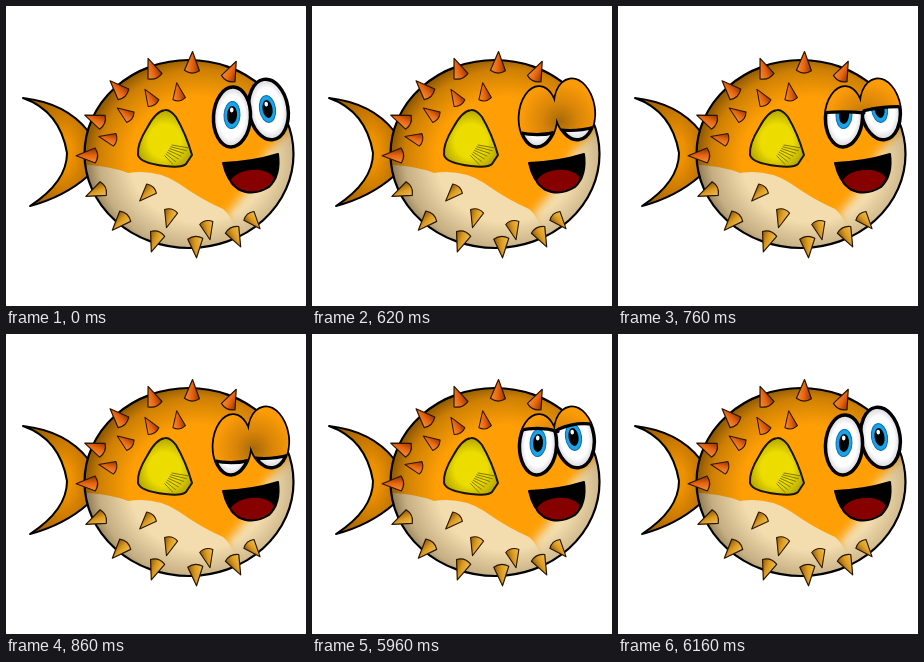
Write an HTML page that moves like this. It is 300 by 300 pixels and loops after 8000 ms.

```html
<!DOCTYPE html>
<html lang="en">
<head>
<meta charset="utf-8">
<title>Blinking puffer fish</title>
<style>
html, body { margin: 0; width: 100%; height: 100%; overflow: hidden; background: #fff; }
svg { display: block; width: 300px; height: 300px; }
</style>
</head>
<body>
<svg viewBox="0 0 300 300" stroke-linejoin="round" stroke-linecap="round">
  <defs>
    <radialGradient id="rim" cx=".55" cy=".53" r=".57">
      <stop offset=".58" stop-color="#3c2400" stop-opacity="0"/>
      <stop offset=".84" stop-color="#3c2400" stop-opacity=".25"/>
      <stop offset="1" stop-color="#241400" stop-opacity=".6"/>
    </radialGradient>
    <radialGradient id="tail" cx=".62" cy=".5" r=".65">
      <stop offset=".2" stop-color="#ef9200"/>
      <stop offset="1" stop-color="#9a5c00"/>
    </radialGradient>
    <radialGradient id="finFill" cx=".5" cy=".55" r=".6">
      <stop offset=".5" stop-color="#ecdc00"/>
      <stop offset="1" stop-color="#a89a00"/>
    </radialGradient>
    <linearGradient id="warm">
      <stop offset="0" stop-color="#f09040"/>
      <stop offset=".5" stop-color="#e8650c"/>
      <stop offset="1" stop-color="#8c3606"/>
    </linearGradient>
    <linearGradient id="pale">
      <stop offset="0" stop-color="#e8c050"/>
      <stop offset=".5" stop-color="#dd9c20"/>
      <stop offset="1" stop-color="#8c5a10"/>
    </linearGradient>
    <radialGradient id="lidFill" gradientUnits="userSpaceOnUse" cx="248" cy="115" r="46">
      <stop offset="0" stop-color="#a86a08"/>
      <stop offset=".4" stop-color="#d98508"/>
      <stop offset=".85" stop-color="#fb9b08"/>
    </radialGradient>
    <radialGradient id="eyeball">
      <stop offset=".7" stop-color="#fff"/>
      <stop offset="1" stop-color="#d4d4dc"/>
    </radialGradient>
    <filter id="soft" x="-50%" y="-50%" width="200%" height="200%"><feGaussianBlur stdDeviation="5"/></filter>
    <ellipse id="body" cx="183" cy="148" rx="104.5" ry="94"/>
    <ellipse id="leftEye" cx="226" cy="111" rx="18.5" ry="30" transform="rotate(3 226 111)"/>
    <ellipse id="rightEye" cx="262.5" cy="103.5" rx="19.5" ry="30.5" transform="rotate(-9 262.5 103.5)"/>
    <path id="mouth" d="M217 157Q246 156 272 148Q275 170 263 181Q247 191 232 183Q221 175 217 157Z"/>
    <clipPath id="inBody"><use href="#body"/></clipPath>
    <clipPath id="inEyes"><use href="#leftEye"/><use href="#rightEye"/></clipPath>
    <clipPath id="inMouth"><use href="#mouth"/></clipPath>
  </defs>

  <path d="M17 92Q60 97 82 125V170Q58 191 24 200Q61 176 61 147Q54 105 17 92Z" fill="url(#tail)" stroke="#000" stroke-width="2"/>
  <use href="#body" fill="#ff9f05"/>
  <g clip-path="url(#inBody)" fill="#f3ddae">
    <path d="M222 206Q246 182 258 150L274 132L300 108V250H222Z" filter="url(#soft)"/>
    <path d="M70 158Q105 160 122 167Q150 163 172 177Q196 194 217 203Q232 215 232 250H70Z"/>
  </g>
  <use href="#body" fill="url(#rim)" stroke="#000" stroke-width="2.2"/>

  <g id="spikes" stroke="#2a1400" stroke-width="1.2"></g>

  <path d="M159 104Q150 105 141 122Q131 138 132 149Q134 157 159 160Q176 162 180 158L186 149Q180 128 170 111Q164 103 159 104Z" fill="url(#finFill)" stroke="#171400" stroke-width="2"/>
  <path id="ribs" fill="none" stroke="#817600"/>

  <use href="#mouth"/>
  <ellipse cx="246" cy="176" rx="22" ry="12" fill="#860000" transform="rotate(-6 246 176)" clip-path="url(#inMouth)"/>
  <use href="#mouth" fill="none" stroke="#000" stroke-width="2"/>

  <g fill="url(#eyeball)" stroke="#000" stroke-width="3.5">
    <use href="#rightEye"/>
    <use href="#leftEye"/>
  </g>
  <g id="pupils"></g>
  <g clip-path="url(#inEyes)">
    <path id="lids" fill="url(#lidFill)"/>
    <path id="edges" fill="none" stroke="#000" stroke-width="3.2"/>
  </g>
</svg>
<script>
const get = id => document.getElementById(id);
const mix = (a, b, k) => a + (b - a) * k;

// A horn on the body, pointing away from its centre.
function spike(degrees, radius, size) {
  const a = degrees * Math.PI / 180;
  const x = 183 + 104 * radius * Math.cos(a), y = 148 + 94 * radius * Math.sin(a);
  const fill = y < 150 ? 'warm' : 'pale';
  return `<path transform="translate(${x} ${y}) rotate(${degrees + 90}) scale(${size})"
    d="M0 -13L-7.5 6Q0 11 7.5 6Z" fill="url(#${fill})"/>`;
}

// Spikes spread evenly along an arc, between two angles and two radii.
const arc = (count, from, to, r0, r1, size) => Array.from({ length: count }, (_, i) => {
  const k = i / (count - 1);
  return spike(mix(from, to, k), mix(r0, r1, k), size);
}).join('');

get('spikes').innerHTML =
  arc(11, 63, 295, .97, .95, 1) + arc(4, 49, 134, .93, .57, .9) + arc(4, 192, 261, .78, .65, .85);

get('ribs').setAttribute('d', Array.from({ length: 7 }, (_, i) =>
  `M${166 - i * 1.2} ${139 + i * 1.8}L${183 - i * 2.7} ${142 + i * 2.7}`).join(''));

const pupil = (x, y, tilt) => `<g transform="translate(${x} ${y}) rotate(${tilt})">
  <ellipse rx="8" ry="13.5" fill="#18a4ea" stroke="#0a6fae"/>
  <ellipse rx="5" ry="9"/>
  <ellipse cx="-.5" cy="-5" rx="1.8" ry="2.4" fill="#fff"/>
</g>`;
get('pupils').innerHTML = pupil(226, 109, 3) + pupil(261.5, 103, -9);

const blinks = [500, 740, 5960];

// Five steps down, one held step, five steps up.
function closure(t) {
  for (const start of blinks) {
    const step = Math.floor((t - start) / 20);
    if (step >= 0 && step < 10) return Math.min(step + 1, 10 - step) / 5;
  }
  return 0;
}

function draw(now) {
  const shut = closure(now % 8000), shown = shut ? 'inline' : 'none';
  const y = mix(88, 135, shut), bend = mix(-10, 10, shut);
  const left = `${y}Q226 ${y + bend} 246 ${y}`;
  const right = `${y - 2}Q266 ${y - 5 + bend} 287 ${y - 6}`;
  get('lids').setAttribute('d', `M203 60V${left}L246 ${right}V60Z`);
  get('edges').setAttribute('d', `M203 ${left}M246 ${right}`);
  get('lids').style.display = get('edges').style.display = shown;
  requestAnimationFrame(draw);
}
requestAnimationFrame(draw);
</script>
</body>
</html>
```
